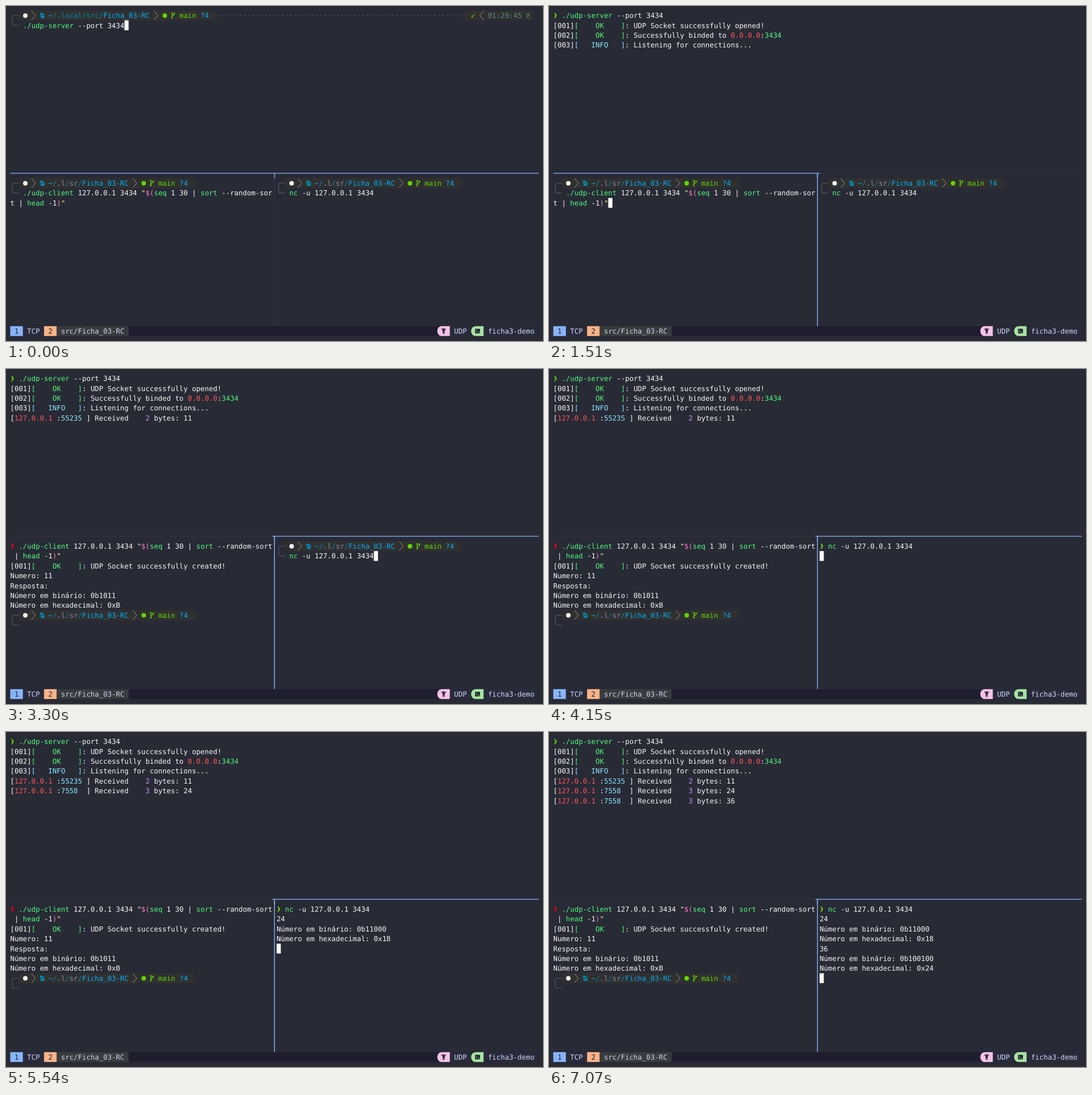
Recreate the animation shown at these times as an HTML page. Size 947 by 591 pixels, loop 7.99 s.

```html
<!DOCTYPE html>
<html lang="en">
<head>
<meta charset="utf-8">
<title>UDP terminal demo</title>
<style>
  html, body { margin: 0; width: 100%; height: 100%; overflow: hidden; background: #282a36; }
  svg { display: block; width: 947px; height: 591px; }
  text {
    font: 12.383px "DejaVu Sans Mono", "Noto Sans Mono", monospace;
    white-space: pre;
    text-rendering: geometricPrecision;
    font-variant-ligatures: none;
  }
</style>
</head>
<body>
<svg id="stage" viewBox="0 0 947 591"></svg>
<script>
const LOOP = 7990;
const CW = 7.455, RH = 17.4, LEFT = 7.5, TOP = 8;
const RIGHT_PANE = 63;

// Colour keys used in the line markup: "^g" switches to green, and so on.
const ink = {
  w: '#f8f8f2', g: '#50fa7b', r: '#ff5555', c: '#8be9fd', p: '#bd93f9',
  k: '#ff79c6', y: '#f1fa8c', b: '#0087af', a: '#00afff', A: '#00afff',
  s: '#8787af', v: '#5fd700', n: '#5faf00', t: '#5f8787', d: '#5c5e66',
  l: '#cdd6f4', x: '#1e1e2e'
};
const BOLD = 'A';
const SEGMENT = '#303030', BORDER = '#313244', ACTIVE = '#89b4fa';

const colX = c => LEFT + c * CW;
const rowY = r => TOP + r * RH;
const num = v => v.toFixed(2);
const escapeText = s => s.replace(/&/g, '&amp;').replace(/</g, '&lt;');

const rect = (x, y, w, h, fill) =>
  `<rect x="${num(x)}" y="${num(y)}" width="${num(w)}" height="${num(h)}" fill="${fill}"/>`;
const cells = (row, from, to, fill) =>
  rect(colX(from), rowY(row), (to - from) * CW, RH, fill);
const cursor = (row, col) => cells(row, col, col + 1, ink.w);
const dot = (x, y, r, fill) => `<circle cx="${num(x)}" cy="${num(y)}" r="${r}" fill="${fill}"/>`;
const fillPath = (d, fill) => `<path d="${d}" fill="${fill}"/>`;
const strokePath = (d, color, width = 1.2) =>
  `<path d="${d}" fill="none" stroke="${color}" stroke-width="${width}"/>`;
const at = (row, col, body) =>
  `<g transform="translate(${num(colX(col))} ${num(rowY(row))})">${body}</g>`;

function line(row, col, markup) {
  let out = '';
  const parts = markup[0] === '^' ? markup.slice(1).split('^') : ('w' + markup).split('^');
  for (const part of parts) {
    const key = part[0], run = part.slice(1);
    const lead = run.length - run.trimStart().length;
    const word = run.trim();
    if (word) {
      const weight = key === BOLD ? ' font-weight="700"' : '';
      out += `<text x="${num(colX(col + lead))}" y="${num(rowY(row) + 13.2)}" ` +
        `fill="${ink[key]}"${weight}>${escapeText(word)}</text>`;
    }
    col += run.length;
  }
  return out;
}

// Half-round end caps, one cell wide
const capLeft = (row, col, fill) =>
  at(row, col, fillPath(`M7.6 0A7.5 8.7 0 0 0 7.6 ${RH}Z`, fill));
const capRight = (row, col, fill) =>
  at(row, col, fillPath(`M-.1 0A7.5 8.7 0 0 1 -.1 ${RH}Z`, fill));

const chevron = (row, col, color) =>
  at(row, col, fillPath('M1.6 4.2H3.6L6.4 8.8L3.6 13.4H1.6L3.7 8.8Z', color));
const separator = (row, col, flip) =>
  at(row, col, strokePath(flip ? 'M7.4 .6L.6 8.7L7.4 16.8' : 'M.2 .6L7 8.7L.2 16.8', '#949494', 1));
const folder = (row, col) => at(row, col,
  fillPath('M.4 4.2H4.1L5.2 5.6H7.8V8H2.2L.4 11.4Z', ink.b) +
  fillPath('M2.8 8.8H9L7.6 13.4H.8Z', ink.b));
const branch = (row, col) => at(row, col,
  strokePath('M2 4.5V13.2M2 10.5C2 8.8 6 9.6 6 6.2', ink.v, 1.3) +
  dot(2, 4.8, 1.4, ink.v) + dot(2, 12.8, 1.4, ink.v) + dot(6, 5.6, 1.4, ink.v));
const clock = (row, col) => at(row, col,
  strokePath('M6.6 5.2A4 4 0 1 0 6.6 12.4M4.4 6.4V9H7', ink.t, 1.1));

function prompt(row, col, path, pathLength) {
  const end = col + 9 + pathLength;
  return at(row, col, strokePath('M14.9 8.7H6.7Q3.7 8.7 3.7 11.7V23.1Q3.7 26.1 6.7 26.1H14.9', '#585a60', 1.1)) +
    cells(row, col + 2, end + 15, SEGMENT) +
    capRight(row, end + 15, SEGMENT) +
    dot(colX(col + 3) + 4.2, rowY(row) + 8.9, 4, '#f4f4f4') +
    separator(row, col + 5) +
    folder(row, col + 7) +
    line(row, col + 9, path) +
    separator(row, end + 1) +
    dot(colX(end + 3) + 4.2, rowY(row) + 8.9, 4, ink.v) +
    branch(row, end + 5) +
    line(row, end + 7, '^vmain ^a?4');
}

const shortPrompt = (row, col) => prompt(row, col, '^A~^b/^s.l^b/^ssr^b/^AFicha_03-RC', 19);

function statusBar() {
  const r = 32;
  return cells(r, 0, 125, '#1e1e2e') +
    cells(r, 0, 3, ACTIVE) + line(r, 1, '^x1') +
    cells(r, 3, 8, '#292b3b') + line(r, 4, '^lTCP') +
    cells(r, 8, 11, '#fab387') + line(r, 9, '^x2') +
    cells(r, 11, 28, '#3a3b3d') + line(r, 12, '^lsrc/Ficha_03-RC') +
    capLeft(r, 101, '#f5c2e7') + cells(r, 102, 104, '#f5c2e7') +
    at(r, 102, dot(3.9, 4.9, 1.5, ink.x) +
      strokePath('M.2 4.4L2.6 7.4H5.2L7.6 4.4', ink.x, 1.4) +
      fillPath('M2.2 6.8H5.6V13.8H4.4V10.8H3.4V13.8H2.2Z', ink.x)) +
    cells(r, 104, 109, '#292b3b') + line(r, 105, '^lUDP') +
    capLeft(r, 109, '#a6e3a1') + cells(r, 110, 112, '#a6e3a1') +
    at(r, 110, `<rect x="-.2" y="4.7" width="8.4" height="8" rx="1" fill="${ink.x}"/>` +
      strokePath('M1.4 6.6L3.4 8.5L1.4 10.4M4.2 10.8H6.8', '#a6e3a1', 1)) +
    cells(r, 112, 125, '#292b3b') + line(r, 113, '^lficha3-demo');
}

function borders(pane) {
  const y = rowY(16) + 8.7, x = colX(62.5);
  const across = (from, to, color) => strokePath(`M${num(colX(from))} ${num(y)}H${num(colX(to))}`, color, 1.4);
  const down = (from, to, color) => strokePath(`M${num(x)} ${num(from)}V${num(to)}`, color, 1.4);
  const span = { top: [0, 125], left: [0, 63], right: [62, 125] }[pane];
  return across(0, 125, BORDER) +
    down(y, rowY(32), pane === 'top' ? BORDER : ACTIVE) +
    down(y, rowY(17), ACTIVE) +
    across(span[0], span[1], ACTIVE);
}

const received = (row, port, size, value) =>
  line(row, 0, `[^r127.0.0.1^w :^c${port.padEnd(5)}^w ] Received    ^p${size}^w bytes: ${value}`);

function serverPane(t) {
  if (t < 850) {
    return prompt(0, 0, '^A~^b/.local/src/^AFicha_03-RC', 24) +
      line(0, 49, '^d' + '·'.repeat(58)) +
      capLeft(0, 107, SEGMENT) + cells(0, 108, 124, SEGMENT) +
      line(0, 109, '^n✔') + separator(0, 111, true) +
      line(0, 113, '^t01:29:45') + clock(0, 122) +
      line(1, 3, '^g./udp-server^w --port 3434') + cursor(1, 27);
  }
  let out = chevron(0, 0, ink.v) +
    line(0, 2, '^g./udp-server^w --port 3434') +
    line(1, 0, '[001]^g[    OK    ]^w: UDP Socket successfully opened!') +
    line(2, 0, '[002]^g[    OK    ]^w: Successfully binded to ^r0.0.0.0^w:^g3434') +
    line(3, 0, '[003]^c[   INFO   ]^w: Listening for connections...');
  if (t < 1510) out += cursor(4, 0);
  if (t >= 2710) out += received(4, '55235', 2, 11);
  if (t >= 5540) out += received(5, '7558', 3, 24);
  if (t >= 7070) out += received(6, '7558', 3, 36);
  return out;
}

function clientPane(t) {
  const start = '^g./udp-client^w 127.0.0.1 3434 ^y"^k$(^gseq^w 1 30 | ^gsort^w --random-sor';
  const tail = ' | ^ghead^w -1^k)^y"';
  if (t < 2710) {
    return shortPrompt(17, 0) + line(18, 3, start) + line(19, 0, 't' + tail) +
      (t >= 1510 ? cursor(19, 13) : '');
  }
  return chevron(17, 0, '#ff0000') +
    line(17, 2, start + 't') +
    line(18, 0, tail) +
    line(19, 0, '[001]^g[    OK    ]^w: UDP Socket successfully created!') +
    line(20, 0, 'Numero: 11') +
    line(21, 0, 'Resposta:') +
    line(22, 0, 'Número em binário: 0b1011') +
    line(23, 0, 'Número em hexadecimal: 0xB') +
    shortPrompt(24, 0) +
    (t < 3300 ? cursor(25, 3) : '');
}

// Number typed in two keystrokes, then answered by the server
function exchange(t, row, value, keys, reply) {
  const typed = String(value).slice(0, keys.filter(k => t >= k).length);
  const out = line(row, RIGHT_PANE, typed || ' ');
  if (t < reply) return out + cursor(row, RIGHT_PANE + typed.length);
  return out +
    line(row + 1, RIGHT_PANE, 'Número em binário: 0b' + value.toString(2)) +
    line(row + 2, RIGHT_PANE, 'Número em hexadecimal: 0x' + value.toString(16).toUpperCase());
}

function netcatPane(t) {
  const command = '^gnc^w -u 127.0.0.1 3434';
  if (t < 4150) {
    return shortPrompt(17, RIGHT_PANE) + line(18, RIGHT_PANE + 3, command) +
      (t >= 3300 ? cursor(18, RIGHT_PANE + 23) : '');
  }
  let out = chevron(17, RIGHT_PANE, ink.v) + line(17, RIGHT_PANE + 2, command) +
    exchange(t, 18, 24, [5340, 5380], 5540);
  if (t >= 5540) out += exchange(t, 21, 36, [6790, 6910], 7070);
  if (t >= 7070) out += cursor(24, RIGHT_PANE);
  return out;
}

const stage = document.getElementById('stage');
let shown = '';

function draw(t) {
  const pane = t < 1510 ? 'top' : t < 3300 ? 'left' : 'right';
  const scene = borders(pane) + serverPane(t) + clientPane(t) + netcatPane(t) + statusBar();
  if (scene !== shown) stage.innerHTML = shown = scene;
}

const begin = performance.now();
function tick() {
  draw((performance.now() - begin) % LOOP);
  requestAnimationFrame(tick);
}
tick();
</script>
</body>
</html>
```
